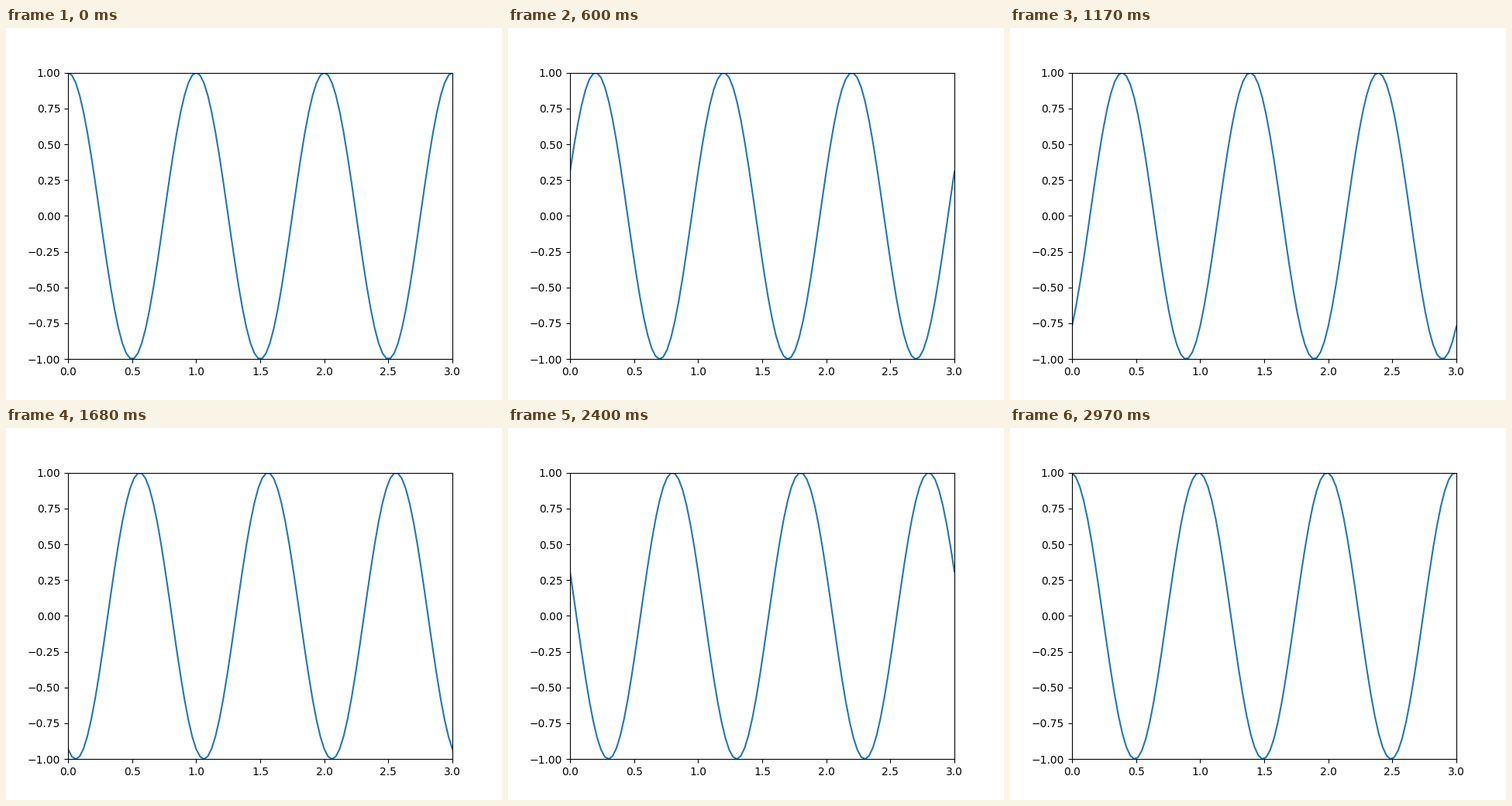
Recreate the animation shown at these times as a matplotlib script. Size 640 px wide and 480 px high, loop 3 s.

```python
import numpy as np
import matplotlib.pyplot as plt
from matplotlib.animation import FuncAnimation

FRAMES = 100
INTERVAL = 30  # ms

x = np.linspace(0, 3, 100)


def wave(shift):
    return np.cos(2 * np.pi * (x - shift))


fig, ax = plt.subplots(figsize=(6.4, 4.8), dpi=100)
ax.set_xlim(0, 3)
ax.set_ylim(-1, 1)
line, = ax.plot(x, wave(0), color="C0", lw=1.5)


def update(i):
    # the wave travels one full period to the right per loop
    line.set_ydata(wave(i / FRAMES))
    return line,


anim = FuncAnimation(fig, update, frames=FRAMES, interval=INTERVAL,
                     repeat=True, repeat_delay=0)
plt.show()
```
